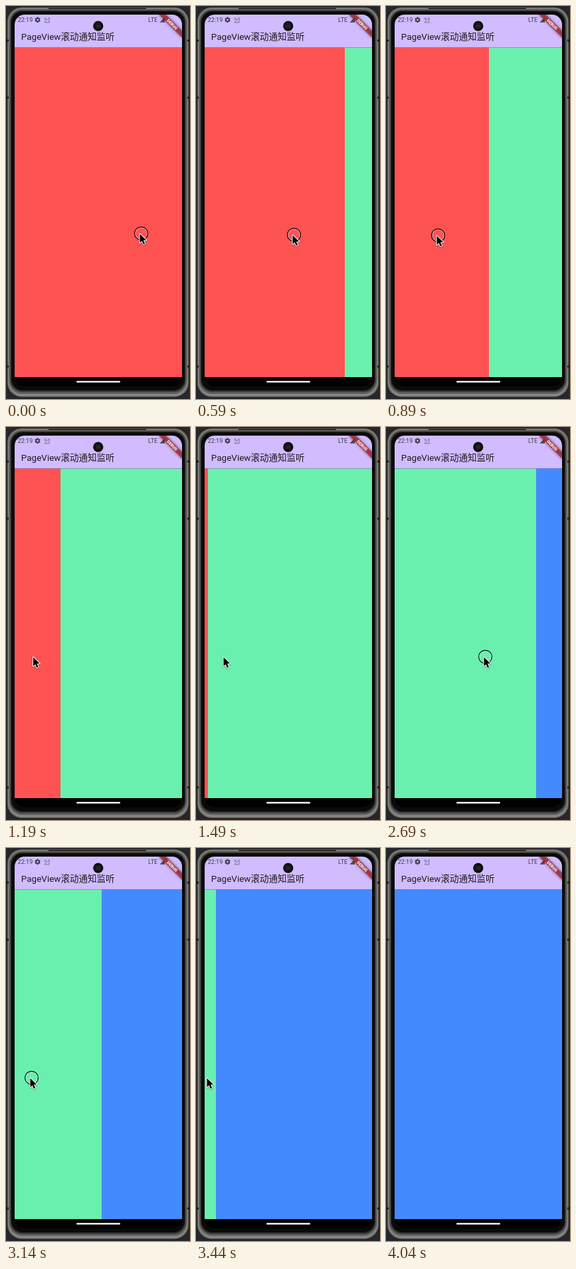
An HTML page with a canvas for the animation above (6.82 s loop, 277x592 px).

```html
<!DOCTYPE html>
<html lang="zh">
<head>
<meta charset="utf-8">
<title>PageView</title>
<style>
  html, body { margin: 0; width: 100%; height: 100%; overflow: hidden; background: #26272c; }
  canvas { display: block; width: 277px; height: 592px; }
</style>
</head>
<body>
<canvas id="stage"></canvas>
<script>
const W = 277, H = 592, LOOP = 6820;
const SCREEN = { x: 13, y: 13, w: 252, h: 560, r: 15 };
const PAGE_TOP = 62.5, PAGE_BOTTOM = 559, LEFT = 13, RIGHT = 265;
const PAGES = ['#ff5252', '#69f0ae', '#448aff'];

const canvas = document.getElementById('stage');
const ctx = canvas.getContext('2d');
const dpr = window.devicePixelRatio || 1;
canvas.width = W * dpr;
canvas.height = H * dpr;

// Pointer tip: time, x, y
const POINTER = [
  [0, 201, 342.5], [300, 201, 342.5], [450, 187, 343], [590, 145, 344.5],
  [740, 108, 345], [890, 76, 345.5], [1040, 50, 346], [1190, 40.5, 346],
  [1490, 41, 346], [1640, 62, 346], [1940, 160, 346], [2090, 188.5, 346],
  [2240, 188.5, 346], [2390, 201, 346], [2540, 181, 346], [2690, 147, 346],
  [3140, 36, 346], [3290, 16, 346], [3590, 16, 346], [3890, 22, 346]
];
// Page boundary: time, x
const FIRST_SWIPE = [[300, 265], [450, 264], [590, 224], [740, 187], [890, 155],
  [1040, 127], [1190, 82], [1340, 34], [1490, 18], [1640, 13]];
const SECOND_SWIPE = [[2390, 265], [2540, 260], [2690, 226], [2990, 172],
  [3140, 144], [3290, 70], [3440, 30], [3590, 17], [3740, 13]];
const PRESSES = [[0, 150], [450, 1190], [2390, 3290]];

function track(keys, t, i = 1) {
  if (t <= keys[0][0]) return keys[0][i];
  for (let k = 1; k < keys.length; k++) {
    const a = keys[k - 1], b = keys[k];
    if (t <= b[0]) return a[i] + (b[i] - a[i]) * (t - a[0]) / (b[0] - a[0]);
  }
  return keys[keys.length - 1][i];
}

function tick(t) {
  if (t >= 590) return 590 + Math.floor((t - 590) / 150) * 150;
  return Math.floor(t / 150) * 150;
}

function box(x, y, w, h, r) {
  ctx.beginPath();
  ctx.roundRect(x, y, w, h, r);
}

function disc(x, y, r, color) {
  ctx.beginPath();
  ctx.arc(x, y, r, 0, Math.PI * 2);
  ctx.fillStyle = color;
  ctx.fill();
}

function ring(x, y, r, width, color) {
  ctx.beginPath();
  ctx.arc(x, y, r, 0, Math.PI * 2);
  ctx.lineWidth = width;
  ctx.strokeStyle = color;
  ctx.stroke();
}

function poly(points) {
  ctx.beginPath();
  for (const [x, y] of points) ctx.lineTo(x, y);
  ctx.closePath();
}

function label(text, x, y, font, color) {
  ctx.font = font;
  ctx.fillStyle = color;
  ctx.fillText(text, x, y);
}

function drawBody() {
  ctx.fillStyle = '#26272c';
  ctx.fillRect(0, 0, W, H);
  // Nested shells from the outer rim to the glass: inset, radius, colour
  const shells = [[0.5, 23, '#1b1b1b'], [1.5, 22, '#50504e'], [3, 21, '#858581'],
    [4.5, 20, '#5c5c59'], [6.5, 18, '#30302f'], [8, 17, '#0a0a0a']];
  for (const [d, r, color] of shells) {
    box(d, d, W - 2 * d, H - 1 - 2 * d - (d > 3 ? d * 0.5 : 0), r);
    ctx.fillStyle = color;
    ctx.fill();
  }
  ctx.fillStyle = '#1c1c1b';
  ctx.fillRect(64, 3, 147, 1.5);
  for (const y of [52, 138, 543]) {
    ctx.fillRect(0, y - 1.5, 4, 3);
    ctx.fillRect(W - 4, y - 1.5, 4, 3);
  }
}

function drawPages(t) {
  const second = t >= 2390;
  const edge = track(second ? SECOND_SWIPE : FIRST_SWIPE, t);
  const from = second ? 1 : 0;
  ctx.fillStyle = PAGES[from];
  ctx.fillRect(LEFT, PAGE_TOP, edge - LEFT, PAGE_BOTTOM - PAGE_TOP);
  ctx.fillStyle = PAGES[from + 1];
  ctx.fillRect(edge, PAGE_TOP, RIGHT - edge, PAGE_BOTTOM - PAGE_TOP);
}

function drawGear(x, y) {
  ctx.save();
  ctx.translate(x, y);
  ctx.fillStyle = '#46414f';
  for (let i = 0; i < 3; i++) {
    ctx.fillRect(-1.2, -4.2, 2.4, 8.4);
    ctx.rotate(Math.PI / 3);
  }
  disc(0, 0, 3.2, '#46414f');
  disc(0, 0, 1.4, '#d0bcff');
  ctx.restore();
}

function drawNoSignal() {
  ctx.strokeStyle = '#635b70';
  ctx.lineWidth = 0.8;
  poly([[65, 17.5], [65, 24.8], [58, 24.8]]);
  ctx.stroke();
  ctx.beginPath();
  ctx.moveTo(57.5, 17.5);
  ctx.lineTo(61, 21);
  ctx.moveTo(61, 17.5);
  ctx.lineTo(57.5, 21);
  ctx.stroke();
}

function drawBanner() {
  ctx.save();
  ctx.translate(RIGHT, SCREEN.y);
  ctx.rotate(Math.PI / 4);
  ctx.filter = `blur(${2 * dpr}px)`;
  ctx.fillStyle = 'rgba(0,0,0,.5)';
  ctx.fillRect(-24.5, 17.2, 49, 7.4);
  ctx.filter = 'none';
  ctx.fillStyle = 'rgba(183,28,28,.63)';
  ctx.fillRect(-24.5, 17.2, 49, 7.4);
  ctx.textAlign = 'center';
  label('DEBUG', 0, 23.1, '900 6.2px Roboto, sans-serif', '#fff');
  ctx.restore();
}

function drawBars() {
  ctx.fillStyle = '#d0bcff';
  ctx.fillRect(LEFT, SCREEN.y, SCREEN.w, PAGE_TOP - SCREEN.y);
  const small = '9px Roboto, sans-serif';
  label('22:19', 17.8, 24.2, small, '#3f3a49');
  drawGear(47.5, 20.8);
  drawNoSignal();
  label('LTE', 214, 24.2, small, '#3f3a49');
  poly([[239, 17], [239, 24.8], [231.2, 24.8]]);
  ctx.fillStyle = '#514a5e';
  ctx.fill();
  label('PageView滚动通知监听', 22.8, 50.7,
    '13.5px Roboto, "Noto Sans CJK SC", "Noto Sans CJK", sans-serif', '#1d1b20');
  drawBanner();
  ctx.fillStyle = '#000';
  ctx.fillRect(LEFT, PAGE_BOTTOM, SCREEN.w, 14);
  box(106, 564.8, 66, 2.5, 1.25);
  ctx.fillStyle = '#f4f4f4';
  ctx.fill();
}

function drawCamera() {
  disc(138.8, 30.2, 7.6, '#0c0c0e');
  disc(138.8, 30.2, 4.4, '#1b1c1e');
  disc(137.2, 30.2, 1.1, '#30332f');
  disc(140.4, 30.2, 1.1, '#30332f');
}

function drawPointer(t) {
  if (t >= 4040) return;
  const x = track(POINTER, t, 1), y = track(POINTER, t, 2);
  if (PRESSES.some(([a, b]) => t >= a && t < b)) {
    ring(x + 2.5, y + 0.2, 8.9, 1, 'rgba(255,255,255,.8)');
    ring(x + 2.5, y + 0.2, 9.9, 1.2, '#000');
  }
  ctx.save();
  ctx.translate(x, y);
  poly([[0.5, 0.8], [0.5, 14.2], [3.6, 11.4], [5.9, 16.4], [8.2, 15.4],
    [5.9, 10.5], [10.2, 10.3]]);
  ctx.lineJoin = 'round';
  ctx.lineWidth = 2;
  ctx.strokeStyle = '#fff';
  ctx.shadowColor = 'rgba(0,0,0,.35)';
  ctx.shadowBlur = 2 * dpr;
  ctx.shadowOffsetY = dpr;
  ctx.stroke();
  ctx.shadowColor = 'transparent';
  ctx.fillStyle = '#000';
  ctx.fill();
  ctx.restore();
}

function draw(t) {
  ctx.setTransform(dpr, 0, 0, dpr, 0, 0);
  drawBody();
  ctx.save();
  box(SCREEN.x, SCREEN.y, SCREEN.w, SCREEN.h, SCREEN.r);
  ctx.clip();
  drawPages(t);
  drawBars();
  ctx.restore();
  drawCamera();
  drawPointer(t);
}

const start = performance.now();
function loop() {
  draw(tick((performance.now() - start) % LOOP));
  requestAnimationFrame(loop);
}
loop();
</script>
</body>
</html>
```
